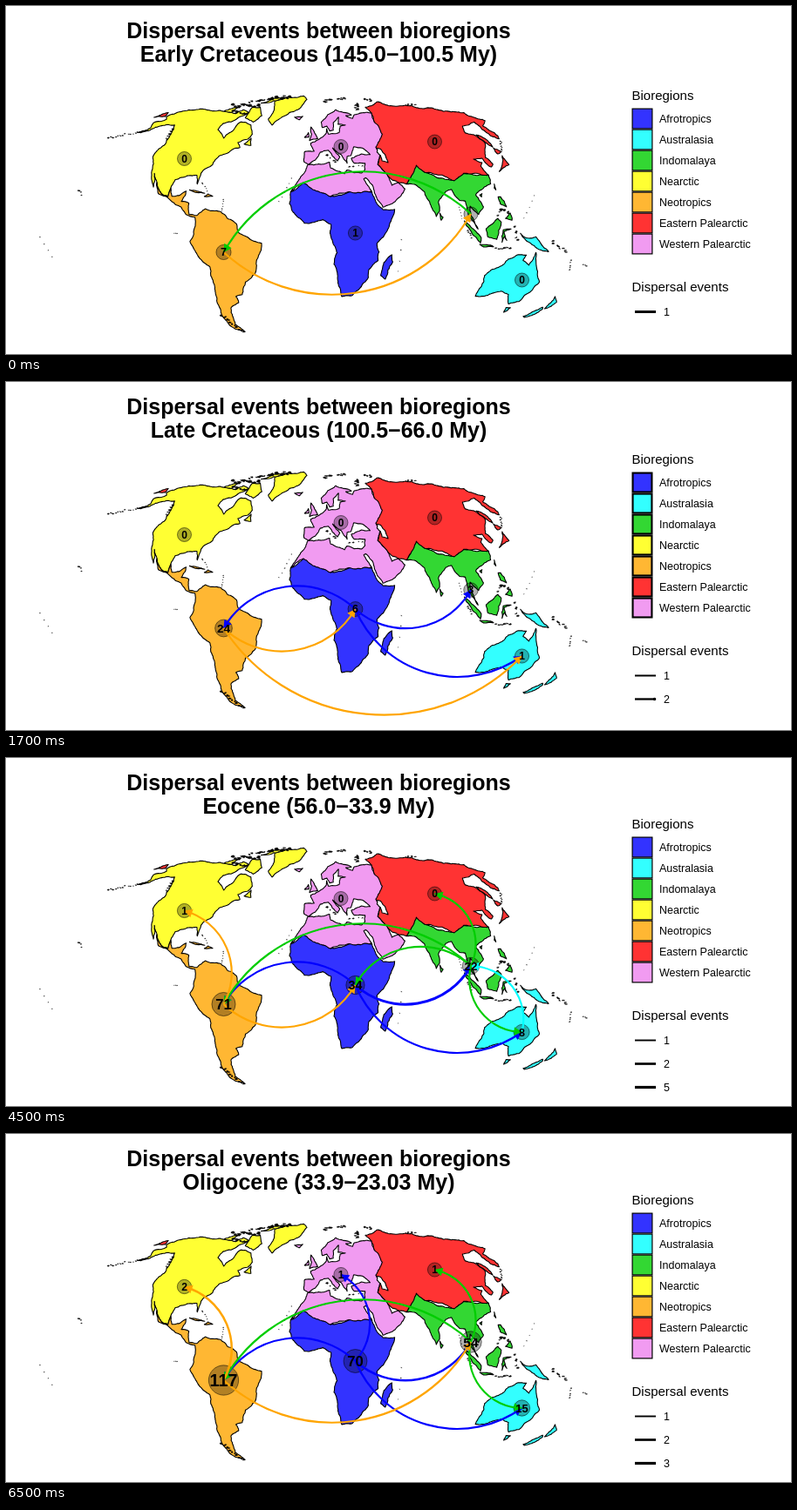
Write an HTML page that moves like this. It is 900 by 400 pixels and loops after 8 s.

```html
<!DOCTYPE html>
<html lang="en">
<head>
<meta charset="utf-8">
<title>Dispersal events</title>
<style>
html, body { margin: 0; width: 100%; height: 100%; overflow: hidden; background: #fff; }
svg { display: block; width: 900px; height: 400px; font-family: "Liberation Sans", Arial, sans-serif; }
</style>
</head>
<body>
<svg viewBox="0 0 900 400">
  <g id="map" stroke="#000" stroke-linejoin="round"></g>
  <g id="view"></g>
</svg>
<script>
// Mollweide projection
function project(lon, lat) {
  const phi = lat * Math.PI / 180, k = Math.PI * Math.sin(phi);
  let a = phi;
  for (let i = 0; i < 12; i++) a -= (2 * a + Math.sin(2 * a) - k) / (2 + 2 * Math.cos(2 * a));
  return [355.5 + 322 * lon / 180 * Math.cos(a), 259.5 - 161 * Math.sin(a)];
}
const points = s => s.trim().split(/\s+/).map(p => project(...p.split(",").map(Number)));
const reverse = s => s.split(" ").reverse().join(" ");
const noise = (x, y) => {
  const v = Math.sin(x * 12.9898 + y * 78.233) * 43758.5453;
  return v - Math.floor(v) - .5;
};

// Midpoint displacement; the same in both directions, so neighbours share their border
function rough(a, b) {
  const dx = b[0] - a[0], dy = b[1] - a[1];
  if (Math.hypot(dx, dy) < 2.5) return [a];
  const x = (a[0] + b[0]) / 2, y = (a[1] + b[1]) / 2;
  const shift = .17 * noise(x, y);
  const mid = [x - dy * shift, y + dx * shift];
  return [...rough(a, mid), ...rough(mid, b)];
}
const coast = s => {
  const p = points(s);
  return p.flatMap((a, i) => rough(a, p[(i + 1) % p.length]));
};

// Borders between two regions
const sahara = "-17,21 -8.7,26 9.5,18.5 22,21 37.3,21";
const ural = "50,30 45,36 49,41.5 48,46 59,54 60,62 67,68.6";
const tibet = "61.5,25.2 66,29 73,35.5 77,31.5 95,27 104,31 121,30";
const mexico = "-109,26 -103,20 -98,18.5 -98,23";

const regions = {
  af: { name: "Afrotropics", fill: "#3333ff", line: "#0000ff", at: [400.5, 261], land: [
    `${sahara} 39.5,15.3 43.5,11.5 51,11.7 47,3.5 39.2,-6 40.6,-15 35,-20 35.4,-24 32.7,-27 26,-34 18.5,-34.5
     14.4,-22.5 11.8,-17 13.6,-11 8.9,-.7 9.5,4 4.5,6.3 -7.5,4.4 -13.5,9 -17.4,14.7`,
    "49.3,-12 50.3,-15.8 47.1,-25 43.6,-23 44.5,-16.2"] },
  au: { name: "Australasia", fill: "#33ffff", line: "#00ffff", at: [591.5, 315], land: [
    `113.7,-23 122,-18 131,-12 136.7,-12.2 135.5,-15 140.5,-17.5 142.5,-10.8 146.3,-18.9 153.3,-26.5 150,-37.3
     144,-38.8 138,-33.5 131,-31.5 123.5,-33.9 115,-34.4`,
    "144.7,-40.8 148.3,-40.9 147,-43.6", "166.5,-46 172.5,-40.6 174,-41.7 168.5,-46.6",
    "172.7,-34.5 178.4,-37.8 175.3,-41.5 174.5,-38", "131,-.8 135,-3.3 141,-2.6 150.5,-10.4 143,-8.8 138,-6"] },
  im: { name: "Indomalaya", fill: "#33d733", line: "#00cd00", at: [533, 239], land: [
    `${tibet} 119,25.2 109,21.3 106,19.3 109,13 105,9 100.5,13.4 100,9 103.8,1.4 98.5,8 98,16 94.3,16.5 91,22.3
     87,21.3 80.2,15.5 79.8,10.5 77.5,8 73,18 72.5,21 67,25`,
    "95.3,5.6 106,-3.2 105.7,-5.8 100,-1", "105.3,-6.6 114.4,-7.8 108,-7.9", "109,1.5 117,7 119,5 116,-4 110,-2.5",
    "119.5,-5.5 120,1 125,1.5 120.5,0 122.5,-4.5 120.8,-2.5", "120.5,18.4 122.2,18.3 124,13 120.5,14.5",
    "122,7 125.5,9.8 126,6", "121.5,25.2 120.2,23 120.8,22", "108.7,19.3 110.5,20 109.5,18.3", "80,9.7 81.8,7.5 80.5,6"] },
  na: { name: "Nearctic", fill: "#ffff33", line: "#ffff00", at: [204.5, 175.5], land: [
    `${mexico} -97.3,27.5 -90,29.7 -83.5,30 -81,25.2 -81.2,31 -75.5,36 -74,40.7 -70,42 -66.5,44.5 -61,45.7 -65,48.8
     -58,51 -57,54 -64.5,60 -72,61.8 -78,62 -77,56.5 -79.5,51.5 -92,57 -94,61 -86,65 -83,69 -95,71 -96,68 -128,70
     -157,71.2 -168,65.8 -161,64 -166,61.5 -158,58 -162,55 -151.5,59.5 -140,60 -131,55 -124,48 -124,40.5 -117,32.5 -110,23.5 -114,31`,
    "-73,78.2 -60,82 -32,83.5 -18,80 -24,71 -38,65.7 -43.5,60 -51.5,64 -54,70.5",
    "-65,62 -78,65 -89,73 -78,73 -62,66.5", "-116,70 -103,69 -108,73", "-89,76.5 -78,77 -64,82 -90,82", "-59,47.8 -53,47 -56,51.5"] },
  ne: { name: "Neotropics", fill: "#ffb733", line: "#ffa500", at: [249.5, 283], land: [
    `${mexico} -95.5,18.6 -91,19 -87,21.4 -88.5,15.9 -83.3,15 -82,9 -77,8.5 -72,12 -62,10.6 -51,4 -50,0 -44,-2.7 -35,-6
     -39,-15 -41,-22 -48.5,-26.5 -53,-33.5 -58,-34.5 -57.5,-38 -65,-41 -67,-46 -69,-51 -65.5,-55 -74,-52 -73.5,-38
     -70.3,-18.4 -76,-14 -81,-5 -77.5,3 -78,7.5 -84,9 -88,13 -95,16 -105,20`,
    "-85,22 -74.2,20.2 -78,21", "-74,18.5 -68.5,18.6 -72,19.8"] },
  ep: { name: "Eastern Palearctic", fill: "#ff3333", line: "#ff0000", at: [491.5, 156], land: [
    `${ural} 69,73 87,75 104,77.6 113,74 140,72.5 160,69.7 180,68.8 178,63 163.5,59.5 160,53 156.7,51 155.7,57 163,62
     143,59.3 135,54.8 140.5,52 140,48.5 128,40 129.3,36 126.5,34.5 125,39.5 118,39 122.3,37 119.5,35
     ${reverse(tibet)} 57,25.8 52,27.8`,
    "130,32 139.5,38.5 142,41 140.8,35.8", "140,42 141.7,45.4 145,43.4", "142.2,46 142,53.5 144,49", "-180,68.8 -170,66 -180,65.3"] },
  wp: { name: "Western Palearctic", fill: "#f19bf1", line: "#ee82ee", at: [384, 161.5], land: [
    `${reverse(sahara)} -9.8,30 -6,35.8 10,37.2 10.5,34 20,30.8 22,32.8 32,31.2 35,33 36,36.6 28,36.7 26.5,39.5 35,42 41.5,41.6
     37,45.5 30.5,46.3 28,43 26.5,41 23.5,40.5 22.8,36.7 19.4,41.5 13.2,45.5 18,40.3 16,38 9.5,44.2 3.2,43 -.5,38.5
     -5.6,36 -9,37.5 -9,43.3 -1.5,43.6 -4.5,48.4 8.5,54 10,57.5 11,54 21,55 23.5,59.3 29,60 22,60.5 25,65.5 17.5,61.5
     16,56.5 12.5,56 10.5,59.2 6,58.3 5.3,62 14,67.5 25.5,71 41,67 34,66.5 40,64.6 44,67
     ${reverse(ural)} 51.5,24.5 56.3,26 59.8,22.5 52,15.8 43.5,12.8 39,21.5 34.7,28.5 33,28 35.5,24`,
    "-5.5,50 1.4,51.2 -2,56 -5,58.6 -4,54", "-10,52 -6.2,52.2 -7,55", "-24,65.5 -15,66 -18,63.5"] }
};
const caspian = "49,45.5 47.5,43 49.3,41 49,38 53,37 53,41 51,45";

// Small islands strewn along a line: course, count, size
const chains = [
  ["-180,51.8 -158,56", 16, 1], ["156,50 146,44", 7, .8], ["152,-5 162,-10.5", 8, 1.5], ["167,-15 169,-20", 5, .8],
  ["-61,17 -61,11", 6, .5], ["-78,26 -73,21.5", 5, .7], ["-160,22 -155.5,19.6", 4, .9], ["-172,-13 -177,-3", 4, .5],
  ["-120,74 -85,75", 16, 2], ["-105,70 -84,68", 10, 1.5], ["-110,77 -90,80", 9, 1.7], ["-92,80 -62,83", 16, 1.8],
  ["-137,58 -128,51", 8, 1.3], ["-75,-45 -67,-55.5", 18, 1.3], ["120,12 125,10", 6, 1.6], ["117,8 119.5,11", 4, 1],
  ["116,-8.5 126,-8.7", 8, 1.3], ["127,2 130,-4", 5, 1.5], ["97,1 100,-3", 5, .8], ["93,13 94,7", 5, .4],
  ["14,79 26,79", 5, 1.8], ["45,80.5 62,81", 8, 1], ["53,71 67,76.5", 9, 1.7], ["95,80 103,79", 4, 1.4],
  ["138,75 150,75", 5, 1.2], ["9,42 15,37", 4, 1.5], ["24,35 34,35", 4, 1], ["-91,-1 -89,-1", 3, .5],
  ["55,-21 55,-4", 4, .5], ["-17,28 -24,16", 6, .6], ["145,19 134,7", 5, .4], ["176,-17 179,-18", 3, .8]];

const attrs = o => Object.entries(o).map(([k, v]) => `${k}="${v}"`).join(" ");
const tag = (name, o, body = "") => `<${name} ${attrs(o)}>${body}</${name}>`;
const label = (x, y, size, s, more = {}) => tag("text", { x, y, "font-size": size, ...more }, s);
const shape = (pts, fill, width = 1.1) => tag("polygon", {
  points: pts.map(p => p.map(v => v.toFixed(1)).join()).join(" "), fill, "stroke-width": width });
const list = Object.values(regions);

function islands([course, count, size]) {
  const [a, b] = points(course);
  return Array.from({ length: count }, (_, i) => {
    const f = i / (count - 1);
    const x = a[0] + (b[0] - a[0]) * f + 2 * size * noise(i, a[0]);
    const y = a[1] + (b[1] - a[1]) * f + 2 * size * noise(i, a[1]);
    const rim = Array.from({ length: 5 }, (_, k) => {
      const r = size * (.7 + noise(x + k, y)), turn = k * Math.PI * .4;
      return [x + 1.4 * r * Math.cos(turn), y + .7 * r * Math.sin(turn)];
    });
    return shape(rim, "#000", .4);
  }).join("");
}

const drawMap = () =>
  list.map(r => r.land.map(s => shape(coast(s), r.fill)).join("")).join("") +
  shape(coast(caspian), "#fff") + chains.map(islands).join("");

// n: counts in the order of the regions; flows: "from-to" or "from-to-width"
const epochs = [
  { start: 0, title: "Early Cretaceous (145.0−100.5 My)", top: 129.5, n: [1, 0, "", 0, 7, 0, 0],
    frame: 1.2, keys: [[1, 3]], flows: "im-ne ne-im" },
  { start: 500, title: "Late Cretaceous (100.5−66.0 My)", top: 115.5, n: [6, 1, 3, 0, 24, 0, 0],
    frame: 2.1, keys: [[1, 2], [2, 2.3]], flows: "af-ne af-im af-au ne-af ne-au" },
  { start: 2500, title: "Paleocene (66.0−56.0 My)", top: 115.5, n: [17, 3, 9, 0, 46, 0, 0],
    frame: 2.1, keys: [[1, 2], [2, 2.3]], flows: "af-ne af-im af-au ne-im" },
  { start: 4500, title: "Eocene (56.0−33.9 My)", top: 102.5, n: [34, 8, 22, 1, 71, 0, 0],
    frame: 1.2, keys: [[1, 1.9], [2, 2.7], [5, 3.2]], flows: "af-ne af-im-3 af-au au-im im-ne im-af im-ep im-au ne-na ne-af" },
  { start: 6500, title: "Oligocene (33.9−23.03 My)", top: 102.5, n: [70, 15, 54, 2, 117, 1, 1],
    frame: 1.2, keys: [[1, 1.9], [2, 2.7], [3, 3.2]], flows: "af-ne af-im-2.5 af-au af-wp im-ne im-ep im-au ne-na-2.5 ne-im" }
];

function flow(code) {
  const [from, to, width = 2.2] = code.split("-");
  const { at: [x1, y1], line } = regions[from], [x2, y2] = regions[to].at;
  const bend = .638; // radius as a share of the chord
  const r = bend * Math.hypot(x2 - x1, y2 - y1);
  const dir = (Math.atan2(y2 - y1, x2 - x1) - Math.asin(.5 / bend)) * 180 / Math.PI;
  return tag("path", { d: `M${x1} ${y1}A${r} ${r} 0 0 0 ${x2} ${y2}`, fill: "none", stroke: line, "stroke-width": width }) +
    tag("path", { d: "M0 0L-9-5V5Z", fill: line, transform: `translate(${x2} ${y2}) rotate(${dir + 4})` });
}

function legend({ top, keys, frame }) {
  let out = label(717.5, top - 21.5, 15, "Bioregions");
  list.forEach((r, i) => {
    const y = top + 24 * i, side = 24 - frame;
    out += tag("rect", { x: 729.5 - side / 2, y: y - side / 2, width: side, height: side,
      fill: r.fill, stroke: "#000", "stroke-width": frame }) + label(749, y + 4.5, 12.5, r.name);
  });
  const base = top + 198.5;
  out += label(717.5, base, 15, "Dispersal events");
  keys.forEach(([n, w], i) => {
    const y = base + 23.5 + 27 * i;
    out += tag("path", { d: `M721 ${y}H745`, stroke: "#000", "stroke-width": w }) + label(754, y + 4.5, 12.5, n);
    if (frame > 2 && i) out += tag("circle", { cx: 743.5, cy: y, r: 1.7 });
  });
  return out;
}

function drawEpoch(e) {
  const bold = { "text-anchor": "middle", "font-weight": "bold" };
  const nodes = list.map(({ at: [cx, cy] }, i) => tag("circle", { cx, cy, r: 8 + .078 * e.n[i],
    "fill-opacity": .3, stroke: "#000", "stroke-opacity": .5 })).join("");
  const counts = list.map(({ at: [x, y] }, i) => {
    const size = 12 + .066 * e.n[i];
    return label(x, y + size * .36, size, e.n[i], bold);
  }).join("");
  return label(358.5, 37, 25, "Dispersal events between bioregions", bold) + label(358.5, 64, 25, e.title, bold) +
    nodes + e.flows.split(" ").map(flow).join("") + counts + legend(e);
}

const view = document.getElementById("view");
let shown;
function render(now) {
  const t = now % 8000;
  const e = epochs.filter(x => x.start <= t).pop();
  if (e !== shown) view.innerHTML = drawEpoch(shown = e);
}
document.getElementById("map").innerHTML = drawMap();
const begin = performance.now();
function tick() {
  render(performance.now() - begin);
  requestAnimationFrame(tick);
}
tick();
</script>
</body>
</html>
```
